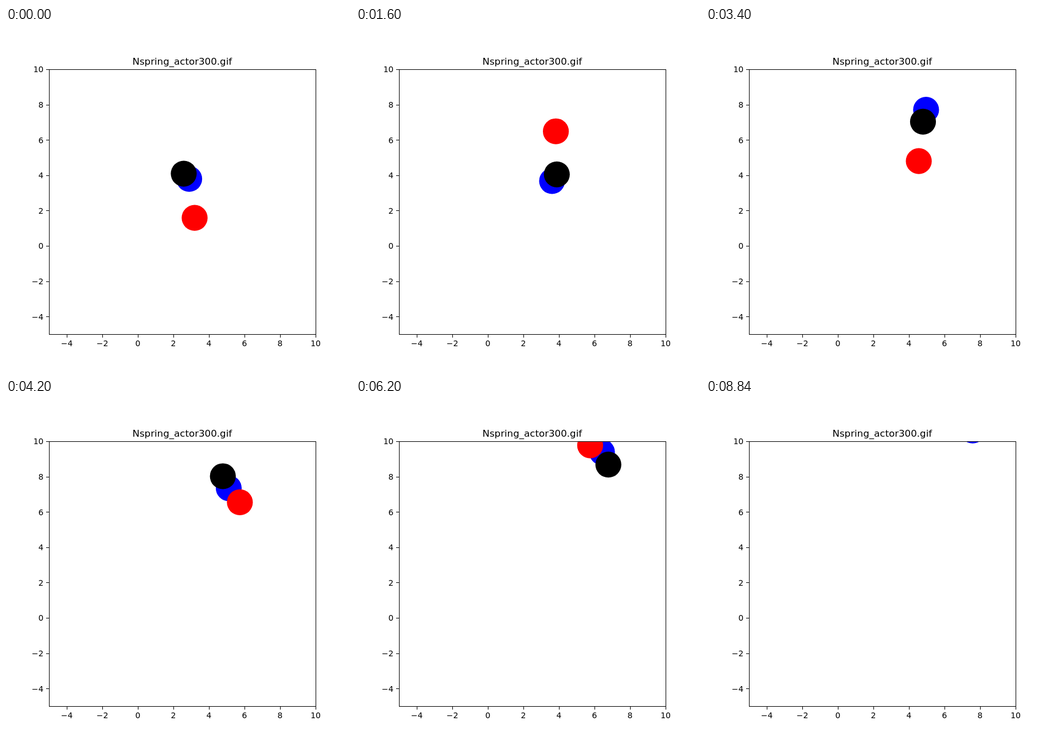
An HTML page for the animation above (8980 ms loop, 600 by 600 pixels).

```html
<!DOCTYPE html>
<html lang="en">
<head>
<meta charset="utf-8">
<title>Three bodies on springs</title>
<style>
  html, body { margin: 0; width: 100%; height: 100%; overflow: hidden; background: #fff; }
  svg { display: block; width: 100%; height: 100%; }
  text { font: 13.89px "DejaVu Sans", sans-serif; }
  .title { font-size: 16.67px; }
  path { fill: none; stroke: #000; shape-rendering: crispEdges; }
</style>
</head>
<body>
<svg viewBox="0 0 600 600">
  <clipPath id="plot"><rect x="75" y="72" width="465" height="462"/></clipPath>
  <g id="balls" clip-path="url(#plot)"></g>
  <path d="M75.5 72.5H540.5V534.5H75.5Z"/>
  <g id="ticks"></g>
  <text class="title" x="307.3" y="64" text-anchor="middle">Nspring_actor300.gif</text>
</svg>
<script>
const LOOP = 8980, FRAME = 100, DT = 0.001;
const STIFFNESS = 1, REST_LENGTH = 0.2;

const toX = x => 230 + 31 * x;
const toY = y => 380 - 30.8 * y;

function add(parent, tag, attributes, text = "") {
  const node = document.createElementNS("http://www.w3.org/2000/svg", tag);
  for (const key in attributes) node.setAttribute(key, attributes[key]);
  node.textContent = text;
  return document.getElementById(parent).appendChild(node);
}

for (let value = -4; value <= 10; value += 2) {
  const label = String(value).replace("-", "\u2212");
  const x = toX(value) + 0.5, y = Math.round(toY(value)) + 0.5;
  add("ticks", "path", { d: `M${x} 535V540M70 ${y}H75` });
  add("ticks", "text", { x: x - 0.5, y: 555, "text-anchor": "middle" }, label);
  add("ticks", "text", { x: 65.3, y: toY(value) + 5.3, "text-anchor": "end" }, label);
}

// Equal masses, listed from back to front.
const bodies = [
  { color: "#00f", x: 2.887, y: 3.792, vx: 0.063, vy: -0.52 },
  { color: "#000", x: 2.581, y: 4.088, vx: 0.134, vy: 1.2 },
  { color: "#f00", x: 3.194, y: 1.584, vx: 1.463, vy: 2.283 }
];
const circles = bodies.map(body => add("balls", "circle", { r: 22.6, fill: body.color }));

function pull(a, b) {
  const dx = b.x - a.x, dy = b.y - a.y;
  const impulse = STIFFNESS * (1 - REST_LENGTH / Math.hypot(dx, dy)) * DT;
  a.vx += impulse * dx;
  a.vy += impulse * dy;
  b.vx -= impulse * dx;
  b.vy -= impulse * dy;
}

function step() {
  const [a, b, c] = bodies;
  const drift = () => bodies.forEach(body => {
    body.x += body.vx * DT / 2;
    body.y += body.vy * DT / 2;
  });
  drift();
  pull(a, b);
  pull(b, c);
  pull(c, a);
  drift();
}

const poses = [];
for (let time = 0; time < LOOP; time += FRAME) {
  poses.push(bodies.map(({ x, y }) => [toX(x), toY(y)]));
  for (let i = 0; i < FRAME / 1000 / DT; i++) step();
}

const start = performance.now();

function draw() {
  const time = (performance.now() - start) % LOOP;
  poses[Math.floor(time / FRAME)].forEach(([x, y], i) => {
    circles[i].setAttribute("cx", x);
    circles[i].setAttribute("cy", y);
  });
  requestAnimationFrame(draw);
}
draw();
</script>
</body>
</html>
```
